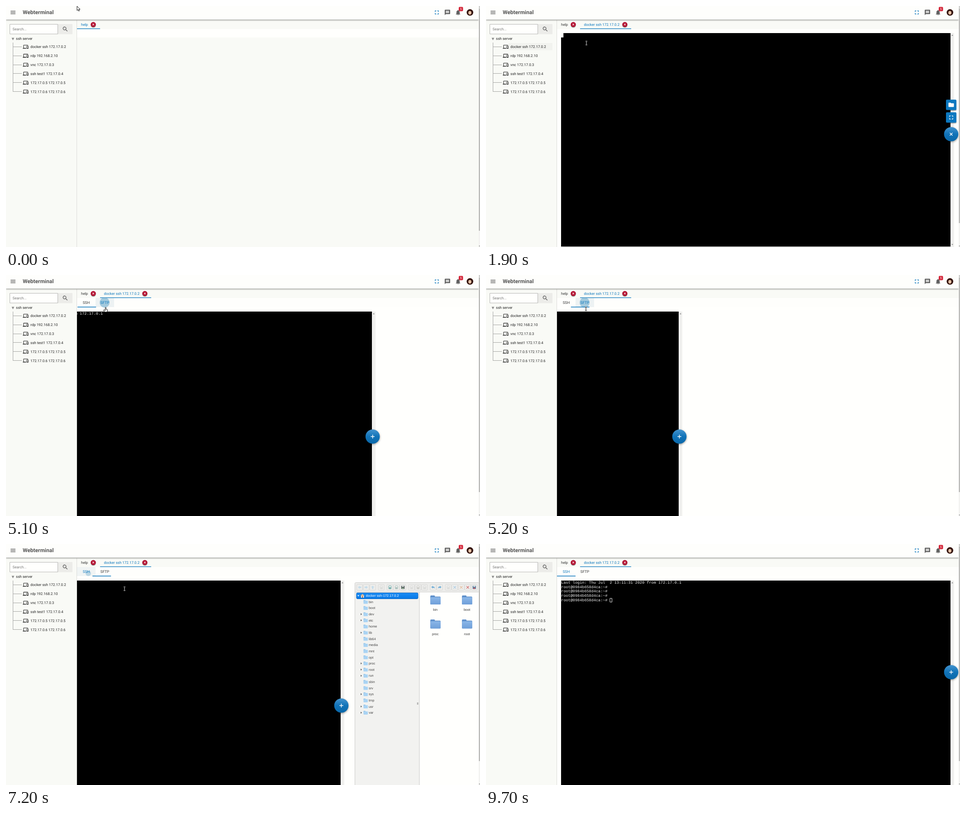
Write an HTML page with a canvas that moves like this. It is 1048 px wide and 534 px high and loops after 9.8 s.

```html
<!DOCTYPE html>
<html lang="en">
<head>
<meta charset="utf-8">
<title>Webterminal</title>
<style>
html, body { margin: 0; width: 100%; height: 100%; overflow: hidden; background: #f9faf6; }
canvas { display: block; }
</style>
</head>
<body>
<canvas id="stage" width="1048" height="534"></canvas>
<script>
const c = document.getElementById('stage').getContext('2d');
const LOOP = 9800, BLUE = '#0a76bd', DARK = '#333', PAPER = '#f9faf6', WHITE = '#fefefc';
const ROBOTO = 'Roboto, sans-serif', ARIAL = '"Liberation Sans", sans-serif', MONO = '"Liberation Mono", monospace';

// Icons on a 24-unit grid
const ICONS = {
  menu: 'M3 18h18v-2H3zM3 13h18v-2H3zM3 6v2h18V6z',
  full: 'M7 14H5v5h5v-2H7zM5 10h2V7h3V5H5zM17 17h-3v2h5v-5h-2zM14 5v2h3v3h2V5z',
  chat: 'M20 2H4Q2 2 2 4V22l4-4h14q2 0 2-2V4q0-2-2-2zM18 14H6v-2h12zM18 11H6V9h12zM18 8H6V6h12z',
  bell: 'M12 22a2 2 0 0 0 2-2h-4a2 2 0 0 0 2 2zM18 16v-5c0-3-1.6-5.6-4.5-6.3V4a1.5 1.5 0 0 0-3 0v.7C7.6 5.4 6 8 6 11v5l-2 2v1h16v-1z',
  search: 'M15.5 14h-.8l-.3-.3A6.5 6.5 0 1 0 13.7 14.4l.3.3v.8l5 5 1.5-1.5zM9.5 14a4.5 4.5 0 1 1 0-9 4.5 4.5 0 0 1 0 9z',
  folder: 'M10 4H4Q2 4 2 6V18q0 2 2 2h16q2 0 2-2V8q0-2-2-2h-8z',
  devices: 'M4 6h18V4H4Q2 4 2 6v11H0v3h14v-3H4zM23 8h-6q-1 0-1 1v10q0 1 1 1h6q1 0 1-1V9q0-1-1-1zM22 17h-4v-7h4z',
};
for (const k in ICONS) ICONS[k] = new Path2D(ICONS[k]);

const SERVERS = ['docker ssh 172.17.0.2', 'rdp 192.168.2.10', 'vnc 172.17.0.3',
  'ssh test1 172.17.0.4', '172.17.0.5 172.17.0.5', '172.17.0.6 172.17.0.6'];
const DIRS = 'bin boot dev etc home lib lib64 media mnt opt proc root run sbin srv sys tmp usr var'.split(' ');
const PARENTS = 'dev etc lib proc root run sys usr var'.split(' ');
const TOOLS = '<>^|p|Nns|pPk|zZ|pxmXd|pPyxo|gpG|ei|rr|Pq|i|f';

// Pointer: time, x, y, shape (a arrow, h hand, i beam, - hidden)
const POINTER = [
  [0, 157, 0, 'a'], [300, 157, 0, 'a'], [600, 128, 38, 'a'], [700, 128, 38, 'a'], [1000, 106, 81, 'a'],
  [1100, 106, 81, 'a'], [1200, 80, 83, 'h'], [1600, 80, 83, 'h'], [1800, 170, 82, 'h'], [1900, 222, 82, 'i'],
  [2300, 1044, 188, 'a'], [2500, 1060, 200, '-'], [2900, 1040, 246, 'a'], [3300, 1028, 213, 'h'],
  [4100, 1028, 213, 'h'], [4400, 1028, 275, 'h'], [4500, 850, 230, 'i'], [4700, 219, 70, 'a'],
  [4900, 219, 66, 'h'], [5200, 221, 75, 'i'], [5800, 221, 75, 'i'], [6000, 239, 123, 'a'],
  [6300, 239, 123, 'a'], [6800, 179, 67, 'h'], [7000, 181, 66, 'h'], [7200, 262, 99, 'i'],
  [7600, 422, 170, 'i'], [8800, 422, 170, 'i'], [9100, 110, 56, 'i'], [9400, 50, 10, 'a'], [9600, 50, 0, '-'], [LOOP, 50, 0, '-'],
];

// cubic-bezier(.35, 0, .25, 1)
function ease(x) {
  if (x <= 0) return 0;
  if (x >= 1) return 1;
  let lo = 0, hi = 1, s;
  for (let i = 0; i < 20; i++) {
    s = (lo + hi) / 2;
    if (1.05 * s * (1 - s) ** 2 + .75 * s * s * (1 - s) + s ** 3 < x) lo = s; else hi = s;
  }
  return s * s * (3 - 2 * s);
}
const tween = (t, start, length) => ease((t - start) / length);

function rect(x, y, w, h, color, r = 0) {
  c.fillStyle = color;
  c.beginPath(); c.roundRect(x, y, w, h, r); c.fill();
}
function frame(x, y, w, h, color, r = 0) {
  c.strokeStyle = color; c.lineWidth = 1;
  c.beginPath(); c.roundRect(x, y, w, h, r); c.stroke();
}
function disc(x, y, r, color) {
  c.fillStyle = color;
  c.beginPath(); c.arc(x, y, r, 0, 7); c.fill();
}
function shape(points, color) {
  c.fillStyle = color;
  c.beginPath();
  for (let i = 0; i < points.length; i += 2) c.lineTo(points[i], points[i + 1]);
  c.closePath(); c.fill();
}
function text(s, x, y, color, size = 8, family = ROBOTO, weight = 400, align = 'left') {
  c.font = `${weight} ${size}px ${family}`;
  c.fillStyle = color; c.textAlign = align;
  c.fillText(s, x, y);
}
function at(x, y, scale, draw) {
  c.save(); c.translate(x, y); c.scale(scale, scale); draw(); c.restore();
}
function icon(name, x, y, size, color) {
  at(x, y, size / 24, () => {
    c.translate(-12, -12);
    c.fillStyle = color; c.fill(ICONS[name], 'evenodd');
  });
}
function cross(x, y, r, angle, color, width) {
  c.save(); c.translate(x, y); c.rotate(angle);
  c.strokeStyle = color; c.lineWidth = width;
  c.beginPath(); c.moveTo(-r, 0); c.lineTo(r, 0); c.moveTo(0, -r); c.lineTo(0, r); c.stroke();
  c.restore();
}
function shadowed(blur, draw) {
  c.save();
  c.shadowColor = 'rgba(0,0,0,.4)'; c.shadowBlur = blur; c.shadowOffsetY = 1.5;
  draw(); c.restore();
}

function header() {
  shadowed(3, () => rect(0, 0, 1045, 30, WHITE));
  icon('menu', 15.5, 14.3, 14.4, '#555');
  text('Webterminal', 37, 18.4, '#555', 12, ROBOTO, 700);
  icon('full', 952.5, 14.3, 14.4, BLUE);
  icon('chat', 976, 14.3, 14.4, '#616161');
  icon('bell', 999.5, 14.5, 14.4, '#616161');
  rect(1001, 2, 9.5, 9.5, '#d32438', 2);
  text('5', 1005.8, 9.2, '#fff', 7, ROBOTO, 400, 'center');
  disc(1025.8, 14.3, 7.3, '#35150f');
  c.fillStyle = '#e8c3a8';
  c.beginPath(); c.ellipse(1025.6, 15, 3.4, 4, 0, 0, 7); c.fill();
}

function sidebar(t) {
  const [, , , hoverSearch] = [0, 0, 0, t >= 9000 && t < 9300];
  rect(0, 32, 156, 502, PAPER);
  rect(156, 31, 1, 503, '#dcdcda');
  rect(8, 40, 107, 22, '#fffffd');
  frame(8.5, 40.5, 106, 21.5, hoverSearch ? '#333' : '#b5b5b3');
  rect(115, 40, 32, 22.5, '#ecece9');
  text('Search...', 14.5, 53.8, '#777');
  icon('search', 131, 51.2, 14.4, '#444');
  shape([12.5, 70.5, 18.2, 70.5, 15.3, 76], '#888');
  text('ssh server', 22, 75, '#222');
  if (t >= 1700 && t < 2100) rect(50, 82, 97, 16, '#f2f3ef');
  rect(15, 81, 1, 109, '#a5a5a3');
  SERVERS.forEach((name, i) => {
    const y = 90.4 + i * 19.85;
    rect(15, Math.round(y - .5), 20, 1, '#a5a5a3');
    icon('devices', 43.5, y, 12.4, '#222');
    text(name, 54, y + 2.9, '#222');
  });
}

function mainTabs(opened) {
  rect(157, 31, 888, 20, PAPER);
  text('help', 166, 44, opened ? DARK : BLUE);
  const closer = x => {
    shadowed(1, () => disc(x, 41, 5.6, '#b00b2c'));
    cross(x, 41, 3, Math.PI / 4, '#ffdfe4', 1);
  };
  closer(193);
  if (opened) {
    text(SERVERS[0], 216.5, 44, BLUE);
    closer(307);
  }
  rect(opened ? 208 : 157, 49.8, opened ? 113 : 51, 1.4, BLUE);
}

function innerTabs(t, selected, ink) {
  const wide = t < 4200, width = wide ? 443.5 : 41;
  rect(157, 51, 888, 21, WHITE);
  if (t >= 4900 && t < 5600) {
    rect(198, 51, 41, 20, '#edf2f3');
    disc(218, 61, 11 * Math.min(1, (t - 4800) / 300), `rgba(70,150,195,${.45 * Math.min(1, (5600 - t) / 400)})`);
  }
  if (t >= 6900 && t < 7600) {
    rect(157, 51, 41, 20, '#f0f4f4');
    disc(182, 65, 6, `rgba(70,150,195,${.3 * Math.min(1, (7600 - t) / 400)})`);
  }
  text('SSH', 157 + width / 2, 64, selected ? DARK : BLUE, 8.1, ROBOTO, 400, 'center');
  text('SFTP', 157 + width * 1.5, 64, selected ? BLUE : DARK, 8.1, ROBOTO, 400, 'center');
  rect(157 + width * ink, 70.2, width, 1.5, BLUE);
}

function fab(t, y) {
  const shut = tween(t, 3960, 400);
  if (shut < 1) for (const [name, by] of [['folder', 219], ['full', 247]])
    at(1028.5, by + (284 - by) * shut, 1 - shut, () => {
      shadowed(2, () => rect(-11.5, -11.5, 23, 23, '#0c78c0', 2));
      icon(name, 0, 0, 14.4, '#fff');
    });
  const g = c.createLinearGradient(0, y - 16, 0, y + 16);
  g.addColorStop(0, '#4494cf'); g.addColorStop(.5, '#1173b8'); g.addColorStop(1, '#0a68a9');
  shadowed(4, () => disc(1028.5, y, 15.8, g));
  cross(1028.5, y, 4.2, Math.PI / 4 * (1 - tween(t, 3940, 250)), '#fff', 1.4);
}

function terminal(t, top, moving) {
  rect(166, top, 861, top > 60 ? 474 : 473, '#000');
  rect(1027, top, 8, 474, '#f1f1ef');
  shape([1029, top + 6, 1033, top + 6, 1031, top + 3.5], '#888');
  if (top === 60) shape([1029, 527.5, 1033, 527.5, 1031, 530], '#888');
  const prompts = t < 2100 ? 0 : t < 8000 ? 1 : t < 8500 ? 2 : 4, row = 9.65;
  const line = (s, i) => text(s, 166.3, top + 7 + i * row, '#f2f2f2', 8.53, MONO);
  if (prompts) line('Last login: Thu Jul  2 13:11:31 2020 from 172.17.0.1', 0);
  for (let i = 1; i <= prompts; i++) line('root@0984b658d4ca:~# ', i);
  const x = prompts ? 273.5 : 166, y = top + prompts * row;
  if (t < 2700 || (t >= 7600 && t < 9600)) rect(x, y, 5.2, row, WHITE);
  else frame(x + .5, y + .8, 4.5, 8.3, '#e8e8e8');
  fab(t, moving ? 358 : 284);
}

function bigFolder(x, y) {
  const g = c.createLinearGradient(0, y - 8, 0, y + 10);
  g.addColorStop(0, '#8db9ea'); g.addColorStop(1, '#6f9fd9');
  rect(x - 11, y - 10, 10, 8, '#5f90cb', 1.5);
  rect(x - 11, y - 7.5, 22.5, 17.5, '#5f90cb', 1.5);
  rect(x - 11, y - 6, 22.5, 16, g, 1.5);
}
function smallFolder(x, y) {
  rect(x - 4.5, y - 4, 4.5, 3, '#8fc0e6', .8);
  rect(x - 4.5, y - 2.8, 9.5, 7, '#a9d3f3', .8);
}

// One glyph around the origin, about 9 units wide
function glyph(k) {
  const arrow = [-4, 0, 0, -4, 0, -1.7, 4, -1.7, 4, 1.7, 0, 1.7, 0, 4];
  if ('<>^'.includes(k)) {
    c.rotate({ '<': 0, '>': Math.PI, '^': Math.PI / 2 }[k]);
    shape(arrow, '#c3dcea');
  } else if ('zZ'.includes(k)) {
    if (k === 'Z') c.scale(-1, 1);
    shape([-4.5, -.5, -.5, -4, -.5, -2, 3, -1.5, 4, 3, 1.5, 1, -.5, 1, -.5, 3], '#73aed6');
  } else if ('xmX'.includes(k)) {
    cross(0, 0, 4.5, Math.PI / 4, { x: '#a9cbe4', m: '#e6bf9f', X: '#d26b6b' }[k], 1.5);
  } else if ('gG'.includes(k)) {
    for (const i of [0, 1, 2, 3]) if (k === 'g' || i !== 0)
      rect(i % 2 ? .4 : -4.4, i > 1 ? .4 : -4.4, 4, 4, '#3a9ad2');
  } else if (k === 'e') {
    c.fillStyle = '#777'; c.beginPath(); c.ellipse(0, 0, 4.8, 3, 0, 0, 7); c.fill();
    disc(0, 0, 1.6, '#222');
  } else if (k === 'i') {
    rect(-4, -4, 8, 8, '#3a8fca', 1);
    rect(-.6, -2.6, 1.2, 1.2, '#fff'); rect(-.6, -.8, 1.2, 3.4, '#fff');
  } else if (k === 's' || k === 'd') {
    rect(-4, -4, 8, 8, k === 's' ? '#4b5558' : '#5579a0', 1);
    rect(-2.3, -4, 4.6, 3, '#dfe6df'); rect(-2.3, 1, 4.6, 3, k === 's' ? '#8fb08f' : '#c05b62');
  } else if (k === 'f') {
    icon('full', 0, 0, 14, '#4c9a58'); cross(0, 0, 4, Math.PI / 4, '#85bd86', 1);
  } else if (k === 'o') disc(0, 0, 3.6, '#f3ca94');
  else {
    const tone = { N: '#65a7a6', n: '#9fb8b4', P: '#c9c9c4', r: '#d6a5a0', y: '#dfcf9f', q: '#aaa' }[k] || '#d8dad8';
    frame(-3, -3.8, 6.5, 7.6, tone, 1);
    rect(-2, 0, 4.5, 3, tone);
  }
}

function fileManager(t) {
  rect(171, 86, 851, 448, '#fffffd');
  rect(171, 86, 851, 20, '#ededeb', 2);
  rect(171, 106, 142, 428, '#f2f2f0');
  frame(170.5, 85.5, 851.5, 460, '#c9c9c7', 2);
  rect(171, 106, 851, 1, '#d0d0ce');
  rect(312.5, 107, 1, 427, '#c8c8c6');
  let x = 181;
  for (const k of TOOLS) {
    if (k === '|') { x += 4.6; continue; }
    frame(x - 6.5, 89.5, 13, 13, '#d8d8d6', 1.5);
    at(x, 96, .9, () => glyph(k));
    x += 14.4;
  }
  rect(901, 89.5, 115, 13, '#fffffd', 6.5);
  frame(901.5, 89.5, 114, 13, '#aaa', 6.5);
  at(908, 96.2, 1, () => {
    c.scale(-1, 1); icon('search', 0, 0, 8, '#555');
  });
  cross(1009.8, 96.2, 2.3, Math.PI / 4, '#555', 1.4);
  rect(1037, 72, 7, 462, '#f0f0ee');
  rect(1037.5, 81, 6, 453, '#bdbdbb');
  shape([1038, 78, 1043, 78, 1040.5, 75], '#666');
  if (t < 5900) return;

  const open = tween(t, 6150, 450);
  if (open) {
    c.save();
    c.beginPath(); c.rect(171, 121, 141, 261 * open); c.clip();
    DIRS.forEach((name, i) => {
      const y = 128.2 + i * 13.64;
      if (PARENTS.includes(name)) shape([183.3, y - 2.2, 186, y, 183.3, y + 2.2], '#555');
      smallFolder(194, y);
      text(name, 201, y + 2.6, '#444', 7.4, ARIAL);
    });
    c.restore();
  }
  const g = c.createLinearGradient(0, 108, 0, 122);
  g.addColorStop(0, '#1a8cf5'); g.addColorStop(1, '#0678e6');
  rect(174, 108, 136, 13.5, g, 2);
  frame(174, 108.3, 136, 13, '#0a65c0', 2);
  if (open) shape([175.8, 113.5, 180.4, 113.5, 178.1, 116.3], '#fff');
  rect(184, 114.5, 6.5, 4.5, '#f3e6d3'); shape([182.5, 115, 187.2, 110.3, 192, 115], '#d9b493');
  rect(186.2, 115.5, 2, 3.5, '#a05a3a');
  text('docker ssh-172.17.0.2', 194.5, 117.4, '#fff', 7.4, ARIAL);
  const grip = open ? 308 : 311.5;
  rect(grip, open ? 351 : 347, 1, 5, '#999'); rect(grip + 1.6, open ? 351 : 347, 1, 5, '#999');

  [...DIRS.filter(d => d !== 'sbin' || true), '.dockerenv'].forEach((name, i) => {
    const fx = 348.3 + i % 10 * 69.95, fy = i < 10 ? 124 : 177.3;
    if (name === '.dockerenv') {
      shape([fx - 9, fy - 14, fx + 7, fy - 14, fx + 14, fy - 7, fx + 14, fy + 13, fx - 9, fy + 13], '#b9d7ee');
      shape([fx + 7, fy - 14, fx + 14, fy - 7, fx + 7, fy - 7], '#86b4da');
      for (let j = 0; j < 6; j++) rect(fx - 5, fy - 3 + j * 2.5, 15, 1, '#82aed2');
      rect(fx - 13.5, fy - 13.5, 17, 9, '#6399cd', 1);
      text('TXT', fx - 5, fy - 6.7, '#fff', 6, ARIAL, 400, 'center');
    } else bigFolder(fx, fy);
    text(name, fx, fy + 24.3, '#333', 7.4, ARIAL, 400, 'center');
  });
}

function pointer(t) {
  const i = POINTER.findLastIndex(p => p[0] <= t);
  const [t0, x0, y0, kind] = POINTER[i], [t1, x1, y1] = POINTER[Math.min(i + 1, POINTER.length - 1)];
  const p = t1 > t0 ? (t - t0) / (t1 - t0) : 0;
  if (kind === '-') return;
  c.save();
  c.translate(x0 + (x1 - x0) * p, y0 + (y1 - y0) * p);
  c.lineJoin = 'round';
  if (kind === 'i') {
    const beam = new Path2D('M-2-4Q0-4 0-3Q0-4 2-4M0-3V3M-2 4Q0 4 0 3Q0 4 2 4');
    c.strokeStyle = '#ddd'; c.lineWidth = 2; c.stroke(beam);
    c.strokeStyle = '#111'; c.lineWidth = 1; c.stroke(beam);
  } else {
    const path = new Path2D(kind === 'a'
      ? 'M0 .5V10L2.3 8 3.8 11.3 5.4 10.6 4 7.4H7z'
      : 'M-1 0Q0-1 1 0V4L4 5V8L3 10H-2L-5 6-3 5-1 7z');
    c.fillStyle = '#fff'; c.fill(path);
    c.strokeStyle = '#111'; c.lineWidth = 1; c.stroke(path);
  }
  c.restore();
}

function draw(t) {
  const opened = t >= 1800, tabs = t >= 3600;
  const slide = tween(t, 4979, 500) - tween(t, 6979, 500);
  const ink = tween(t, 5077, 250) - tween(t, 7149, 250);
  rect(0, 0, 1048, 534, PAPER);
  mainTabs(opened);
  rect(157, 51.2, 888, opened ? 483 : 18.5, '#fffffd');
  if (opened) {
    if (tabs) innerTabs(t, t >= 4950 && t < 6950, ink);
    c.save();
    c.beginPath(); c.rect(157, tabs ? 72 : 52, 888, 482); c.clip();
    c.translate(-888 * slide, 0);
    if (slide < 1) terminal(t, tabs ? 81 : 60, slide > 0);
    c.translate(888, 0);
    if (slide > 0 && t >= 5400) fileManager(t);
    c.restore();
  }
  sidebar(t);
  header();
  rect(1045, 0, 3, 534, '#f3f3f1');
  rect(1045.5, 5, 2.5, opened ? 476 : 493, '#b9b9b7');
  shape([1045.5, 3, 1048, 3, 1046.8, 1], '#777');
  shape([1045.5, 531, 1048, 531, 1046.8, 533], '#777');
  pointer(t);
}

c.textRendering = 'geometricPrecision';
function tick() {
  draw(Math.floor(performance.now() % LOOP / 100) * 100);
  requestAnimationFrame(tick);
}
tick();
</script>
</body>
</html>
```
